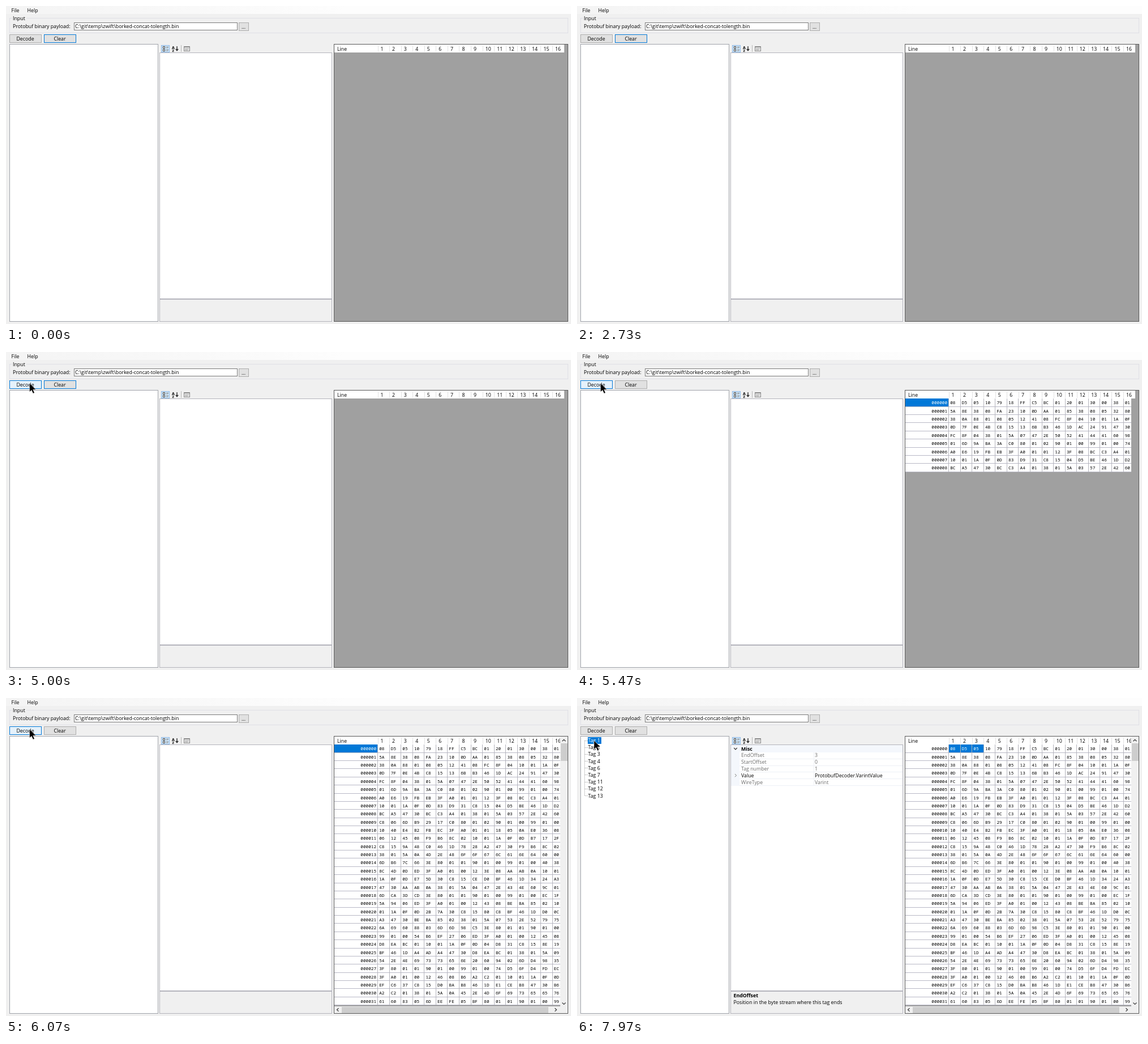
These frames come from a looping animation (998x561 px, 8000 ms). An HTML page:

```html
<!DOCTYPE html>
<html lang="en">
<head>
<meta charset="utf-8">
<title>Protobuf decoder</title>
<style>
html, body { margin: 0; width: 100%; height: 100%; overflow: hidden; background: #f0f0f0; }
svg { display: block; width: 100%; height: 100%; }
text { font: 8.8px "Open Sans", "Noto Sans", sans-serif; fill: #000; white-space: pre; }
.hex { font: 500 7.7px "Noto Sans Mono", "DejaVu Sans Mono", monospace; }
.bold { font-weight: 700; }
.dim { fill: #6d6d6d; }
.end { text-anchor: end; }
.mid { text-anchor: middle; }
rect, line { shape-rendering: crispEdges; }
.on rect { fill: #0078d7; }
.on text { fill: #fff; }
</style>
</head>
<body>
<svg id="stage" viewBox="0 0 998 561" preserveAspectRatio="none"></svg>
<script>
const LOOP = 8000;
const CLICK = 5200, FILL = 5245, RATE = 230 / 360, FULL = 6050, TREE = 6300, PICK = 7330;
const COL = 20.57, ROW = 14.37, LEFT = 657, TOP = 82.3;
const BLUE = '#0078d7';

const dump = `
08 D5 05 10 79 18 FF C5 BC 01 20 01 30 00 38 01
5A 8E 38 08 FA 23 10 0D AA 01 85 38 08 05 32 80
38 0A 88 01 08 05 12 41 08 FC 8F 04 10 01 1A 0F
0D 7F 0E 4B C8 15 13 6B B3 46 1D AC 24 91 47 30
FC 8F 04 38 01 5A 07 47 2E 50 52 41 44 41 60 98
01 6D 9A BA 3A C0 80 01 02 90 01 00 99 01 00 74
A0 E6 19 FB EB 3F A0 01 01 12 3F 08 BC C3 A4 01
10 01 1A 0F 0D 83 D9 31 C8 15 04 D5 BE 46 1D D2
BC A5 47 30 BC C3 A4 01 38 01 5A 03 57 2E 42 60
C8 06 6D B9 29 17 C0 80 01 02 90 01 00 99 01 00
10 40 E4 B2 FB EC 3F A0 01 01 18 05 0A E0 36 08
06 12 45 08 F9 B6 8C 02 10 01 1A 0F 0D B7 17 2F
C8 15 9A 48 C0 46 1D 78 28 A2 47 30 F9 B6 8C 02
38 01 5A 0A 4D 2E 48 6F 6F 67 6C 61 6E 64 60 00
6D B6 7C 66 3E 80 01 01 90 01 00 99 01 00 40 38
8C 4D 0D ED 3F A0 01 00 12 3E 08 AA AB 0A 10 01
1A 0F 0D E7 5D 30 C8 15 CE D0 BF 46 1D 34 24 A3
47 30 AA AB 0A 38 01 5A 04 47 2E 43 4E 60 9C 01
6D CA 3D CD 3E 80 01 01 90 01 00 99 01 00 EC 1F
5A 94 06 ED 3F A0 01 00 12 43 08 BE BA 85 02 10
01 1A 0F 0D 2B 7A 30 C8 15 80 C8 BF 46 1D D0 0C
A3 47 30 BE BA 85 02 38 01 5A 07 53 2E 52 79 75
6A 69 60 88 03 6D 6D 98 C5 3E 80 01 01 90 01 00
99 01 00 54 B6 EF 27 06 ED 3F A0 01 00 12 45 08
D8 EA BC 01 10 01 1A 0F 0D 04 D8 31 C8 15 8E 19
BF 46 1D A4 AD A4 47 30 D8 EA BC 01 38 01 5A 09
54 2E 4E 69 73 73 65 6E 20 60 94 02 6D D4 98 35
3F 80 01 01 90 01 00 99 01 00 74 D5 6F D4 FD EC
3F A0 01 00 12 46 08 B6 A2 C2 01 10 01 1A 0F 0D
EF C6 37 C8 15 D0 BA B8 46 1D E1 CE B8 47 30 B6
A2 C2 01 38 01 5A 0A 45 2E 4D 6F 69 73 65 65 76
61 60 83 05 6D EE FE 05 BF 80 01 01 90 01 00 99`.trim().split('\n').map(r => r.split(' '));

const stage = document.getElementById('stage');

function el(tag, attrs, parent = stage, content = '') {
  const node = document.createElementNS('http://www.w3.org/2000/svg', tag);
  for (const key in attrs) node.setAttribute(key, attrs[key]);
  node.textContent = content;
  parent.append(node);
  return node;
}
const rect = (x, y, w, h, fill, parent) => el('rect', { x, y, width: w, height: h, fill }, parent);
const label = (s, x, y, cls = '', parent) => el('text', { x, y, class: cls }, parent, s);
const line = (x1, y1, x2, y2, stroke, parent, dash = 'none') =>
  el('line', { x1, y1, x2, y2, stroke, 'stroke-dasharray': dash }, parent);
const path = (d, stroke, parent, fill = 'none', width = 1) =>
  el('path', { d, stroke, fill, 'stroke-width': width }, parent);
const group = (attrs = {}, parent) => el('g', attrs, parent);
const show = (node, on) => node.style.display = on ? '' : 'none';

function box(x, y, w, h, border, fill, parent) {
  const r = rect(x + .5, y + .5, w - 1, h - 1, fill, parent);
  r.setAttribute('stroke', border);
  return r;
}

function button(s, x, y, w, h) {
  const face = box(x, y, w, h, '#adadad', '#e1e1e1');
  label(s, x + w / 2 - .5, y + h / 2 + 3.2, 'mid');
  return face;
}

function style(face, fill, border, width = 1) {
  face.setAttribute('fill', fill);
  face.setAttribute('stroke', border);
  face.setAttribute('stroke-width', width);
}

// Menu and input area
const shade = el('linearGradient', { id: 'menu' }, el('defs', {}));
el('stop', { offset: 0, 'stop-color': '#f4f4f4' }, shade);
el('stop', { offset: .6, 'stop-color': '#fdfdfd' }, shade);
rect(0, 0, 998, 14, 'url(#menu)');
label('File', 9.5, 10.5);
label('Help', 37.5, 10.5);
box(6, 21, 987, 27, '#dfdfe6', 'none');
rect(10, 17, 26, 9, '#f0f0f0');
label('Input', 12, 25);
label('Protobuf binary payload:', 12, 39.3);
box(120, 29, 289, 14, '#7a7a7a', '#fff');
label('C:\\git\\temp\\zwift\\borked-concat-tolength.bin', 122, 39.3);
button('...', 411, 29, 18, 15);
const decode = button('Decode', 6, 50, 57, 15);
const clear = button('Clear', 67, 50, 57, 15);

// Tag tree
box(6, 67, 263, 490, '#a0a3aa', '#fff');
const tree = group();
line(13.5, 75, 13.5, 172.5, '#a0a0a0', tree, '1 1');
const tags = [1, 2, 3, 4, 6, 7, 11, 12, 13].map((n, i) => {
  const y = 75 + i * 12.19, g = group({}, tree);
  line(14, y, 19, y, '#a0a0a0', g, '1 1');
  rect(19, y - 6, 24, 12, 'none', g);
  label('Tag ' + n, 19.5, y + 3, '', g);
  return g;
});

// Property panel
box(274, 69, 15, 13, '#8fb9e6', '#cce4f7');
for (const y of [71, 76]) {
  box(277, y, 4, 4, '#444', '#fff');
  line(283, y + 1.5, 287, y + 1.5, '#777');
  line(283, y + 3.5, 286, y + 3.5, '#aaa');
}
label('A', 293, 75.5, 'bold').style.fontSize = '7px';
label('Z', 293.5, 81, 'bold').style.fontSize = '6px';
path('M302 71V78M299.8 75.8L302 78.6L304.2 75.8', '#222', stage, 'none', 1.3);
line(309.5, 69, 309.5, 81, '#b8b8b8');
box(314, 71, 11, 9, '#8c8c8c', '#e4e4e4');
rect(314, 71, 11, 2, '#8c8c8c');
line(316, 75.5, 323, 75.5, '#a8a8a8');
line(316, 77.5, 321, 77.5, '#a8a8a8');
box(271, 82, 305, 435, '#b4b4bc', '#fff');
box(271, 517, 305, 40, '#b4b4bc', '#f0f0f0');

const props = group();
rect(272, 83, 15, 71.5, '#f4f7fc', props);
rect(272, 83, 303, 12.5, '#f4f7fc', props);
path('M277.2 88L280 90.8L282.8 88', '#333', props, 'none', 1.2);
label('Misc', 290, 92.6, 'bold', props);
[['EndOffset', '3'], ['StartOffset', '0'], ['Tag number', '1'],
 ['Value', 'ProtobufDecoder.VarintValue'], ['WireType', 'Varint']].forEach(([key, value], i) => {
  const y = 101.3 + i * 11.8, cls = key === 'Value' ? '' : 'dim';
  label(key, 290, y + 3, cls, props);
  label(value, 420, y + 3, cls, props);
  line(287, y + 6, 575, y + 6, '#edf0f6', props);
});
line(418.5, 96, 418.5, 154, '#edf0f6', props);
path('M279 134L281.6 136.6L279 139.2', '#777', props);
label('EndOffset', 276.5, 528.3, 'bold', props);
label('Position in the byte stream where this tag ends', 276.5, 540.3, '', props);

// Byte grid
box(579, 67, 414, 490, '#5a5a5a', '#a0a0a0');
rect(580, 68, 405.5, 14, '#fff');
label('Line', 585, 78.6);
for (let i = 0; i < 16; i++) {
  const x = LEFT + i * COL;
  line(x, 69, x, 81, '#e2e2e2');
  label(i + 1, x + 4.5, 78.6);
}
const clip = el('clipPath', { id: 'view' });
rect(580, 68, 399, 476, '#fff', clip);
const grid = group({ 'clip-path': 'url(#view)' });

function cell(s, x, y, w, textX, cls) {
  const g = group({}, grid);
  rect(x, y, w, ROW, '#fff', g);
  line(x, y + ROW - .5, x + w, y + ROW - .5, '#b9b9c6', g);
  line(x + w - .5, y, x + w - .5, y + ROW, '#b4b4bc', g);
  label(s, textX, y + 10, cls, g);
  return g;
}
const heads = [], cells = [];
dump.forEach((bytes, r) => {
  const y = TOP + r * ROW;
  heads.push(cell(String(r).padStart(6, '0'), 580, y, LEFT - 580, 654, 'hex end'));
  bytes.forEach((b, c) => cells.push(cell(b, LEFT + c * COL, y, COL, LEFT + 2.2 + c * COL, 'hex')));
});

// Scroll bars
const bars = group();
rect(979, 68, 13, 488, '#f0f0f0', bars);
rect(580, 543.5, 412, 12.5, '#f0f0f0', bars);
rect(980, 80, 11.5, 31, '#cdcdcd', bars);
rect(593, 544.5, 365, 11, '#cdcdcd', bars);
for (const d of ['M982.5 76.3L985.5 73.5L988.5 76.3', 'M982.5 537.6L985.5 540.4L988.5 537.6',
                 'M587.5 547.2L584.5 550L587.5 552.8', 'M969.5 547.2L972.5 550L969.5 552.8'])
  path(d, '#444', bars, 'none', 1.3);

const cursor = path('M0 0V15.4L3.6 12.4L6.3 18.2L8.9 17.1L6.3 11.4L11.2 11Z', '#fff', stage, '#000', .6);

// Pointer stops: time, x, y
const stops = [[4230, 205, 0], [4330, 132.5, 26.5], [4640, 41.5, 55], [6900, 41.5, 55], [7220, 30, 75]];

function pointer(t) {
  const i = stops.findIndex(s => s[0] > t);
  if (i < 0) return stops[stops.length - 1].slice(1);
  const [t0, x0, y0] = stops[i - 1], [t1, x1, y1] = stops[i];
  const u = (t - t0) / (t1 - t0);
  const k = i === 1 ? u : 1 - (1 - u) ** 2;
  return [x0 + (x1 - x0) * k, y0 + (y1 - y0) * k];
}

let shown = -1;
function fill(count) {
  if (count === shown) return;
  shown = count;
  heads.forEach((g, r) => show(g, r * 16 < count));
  cells.forEach((g, i) => show(g, i < count));
}

function draw(t) {
  const picked = t >= PICK;
  const [x, y] = t < stops[0][0] ? [0, 0] : pointer(t);
  const over = t >= 4600 && y < 64 && t < 7100;

  show(cursor, t >= stops[0][0]);
  cursor.setAttribute('transform', `translate(${x} ${y})`);

  if (t < CLICK) style(clear, '#e1e1e1', BLUE, 1.6);
  else style(clear, '#e1e1e1', '#adadad');
  if (over) style(decode, '#e5f1fb', BLUE);
  else if (t >= CLICK && !picked) style(decode, '#e1e1e1', BLUE, 1.6);
  else style(decode, '#e1e1e1', '#adadad');

  fill(Math.max(0, Math.min(cells.length, Math.round((t - FILL) * RATE))));
  show(bars, t >= FULL);
  show(tree, t >= TREE);
  show(props, picked);
  heads[0].classList.toggle('on', !picked);
  tags[0].classList.toggle('on', picked);
  for (let i = 0; i < 3; i++) cells[i].classList.toggle('on', picked);
}

const start = performance.now();
function tick() {
  draw((performance.now() - start) % LOOP);
  requestAnimationFrame(tick);
}
tick();
</script>
</body>
</html>
```
